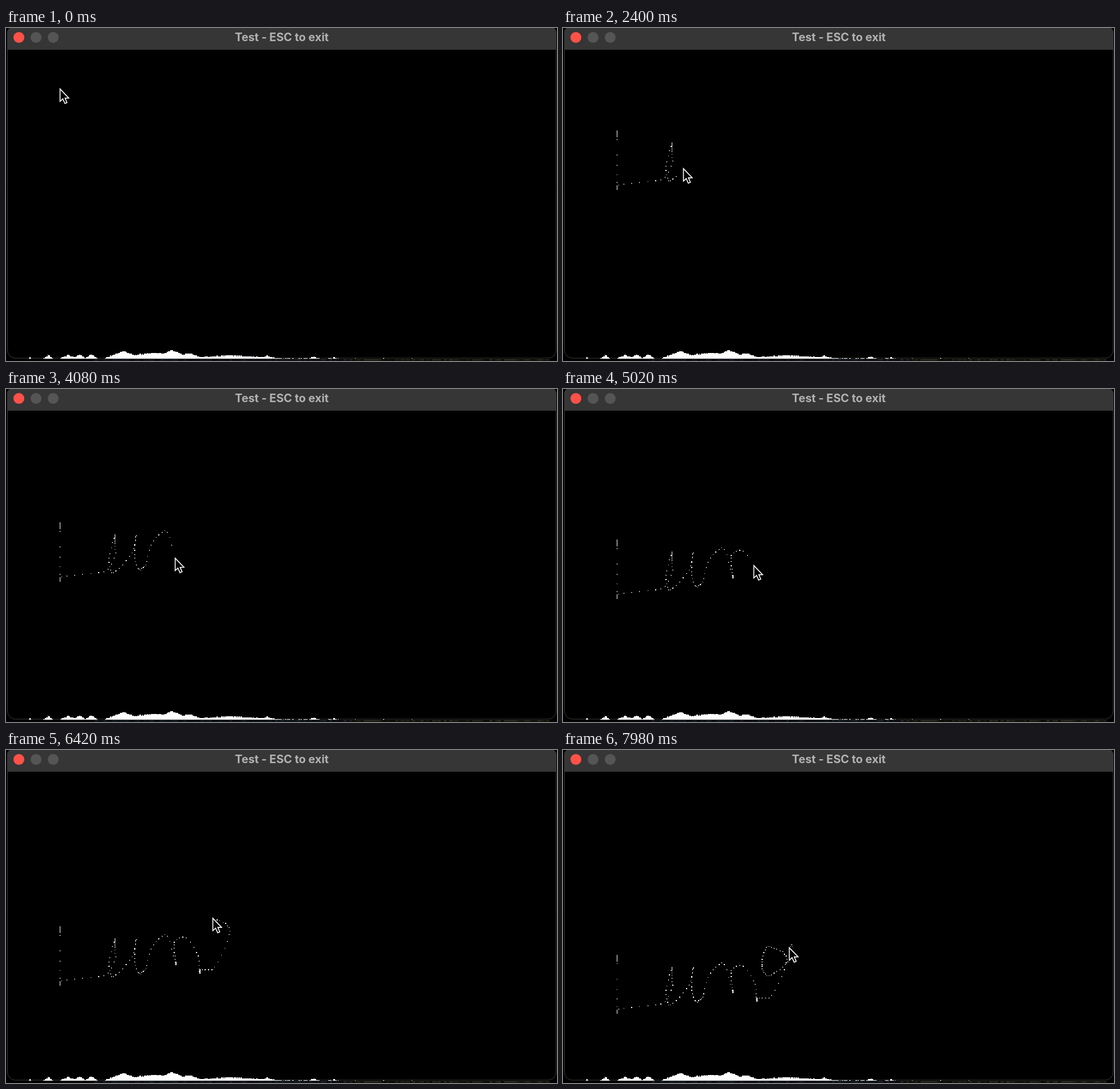
An HTML page with a canvas that plays this animation: 963x582 px, repeating every 8 s.

```html
<!DOCTYPE html>
<html lang="en">
<head>
<meta charset="utf-8">
<title>Falling sand</title>
<style>
  html, body { margin: 0; width: 100%; height: 100%; overflow: hidden; background: #000; }
  canvas { position: absolute; left: 0; top: 0; }
  #title {
    position: absolute; left: 0; top: 0; width: 964px; text-align: center;
    font: 700 19.8px/32px Inter, Roboto, sans-serif; color: #b2b2b2; white-space: pre;
  }
</style>
</head>
<body>
<canvas id="stage" width="963" height="582"></canvas>
<div id="title">Test - ESC to exit</div>
<script>
const LOOP = 8000;
const STEP = 840 / 18;          // ms per simulation step
const GRAIN = 1.5;              // size of one grain, also its fall per step
const LEFT = 2, TOP = 38;       // origin of the sand grid
const ROWS = 360;
const LAG = 2;                  // steps before a new grain shows up

const ctx = document.getElementById('stage').getContext('2d');

// Turning points of the handwriting: step, x, y
const KEYS = [
  [3, 94, 106], [5, 94, 150.5], [10, 94, 218], [15, 94, 219.5], [22, 171, 220.5],
  [26, 191, 193], [34, 190, 176], [38, 190, 181], [43, 180, 228], [48, 187, 261],
  [54, 220, 234.5], [59, 227, 213], [64, 224, 253.5], [70, 235, 288.5], [74, 244, 286],
  [78, 253, 257.5], [83, 277, 240], [89, 296, 301], [95, 296, 305], [100, 293, 283.5],
  [104, 308, 275.5], [108, 333, 308], [114, 338, 353], [118, 338, 354.5], [123, 359, 360.5],
  [130, 391, 303.5], [138, 361, 293.5], [146, 347, 337], [154, 361, 368.5], [162, 395, 353],
  [167, 400, 334.5], [171, 395, 345]
];

// Settled sand as tents: centre, height, half width
const TENTS = [
  [41, 3, 4], [73, 7, 10], [108, 7, 16], [128, 8, 12], [148, 8, 12], [204, 14, 34],
  [258, 11, 90], [289, 15, 40], [318, 10, 30], [390, 6, 110], [456, 6, 14],
  [537, 4, 8], [573, 3, 5]
];

function seeded(seed) {
  return () => (seed = (seed * 16807) % 2147483647) / 2147483647;
}

const slope = (i, axis) =>
  (KEYS[i + 1][axis] - KEYS[i][axis]) / (KEYS[i + 1][0] - KEYS[i][0]);

// Smooth tangent that never overshoots: flat at turning points and pauses
function tangent(i, axis) {
  if (i === 0 || i === KEYS.length - 1) return 0;
  const a = slope(i - 1, axis), b = slope(i, axis);
  if (a * b <= 0) return 0;
  const before = KEYS[i][0] - KEYS[i - 1][0], after = KEYS[i + 1][0] - KEYS[i][0];
  const mean = (a * after + b * before) / (before + after);
  return Math.sign(a) * Math.min(Math.abs(mean), 3 * Math.abs(a), 3 * Math.abs(b));
}

function pointerAt(step) {
  const last = KEYS.length - 1;
  if (step <= KEYS[0][0]) return KEYS[0].slice(1);
  if (step >= KEYS[last][0]) return KEYS[last].slice(1);
  const i = KEYS.findIndex(k => k[0] > step) - 1;
  const span = KEYS[i + 1][0] - KEYS[i][0];
  const u = (step - KEYS[i][0]) / span, v = 1 - u;
  return [1, 2].map(axis =>
    KEYS[i][axis] * v * v * (1 + 2 * u) + KEYS[i + 1][axis] * u * u * (3 - 2 * u) +
    span * u * v * (v * tangent(i, axis) - u * tangent(i + 1, axis)));
}

function rect(color, x, y, w, h) {
  ctx.fillStyle = color;
  ctx.fillRect(x, y, w, h);
}

// White cells of the sand grid, on whole pixels
function cells(col, row, rows = 1) {
  const x = Math.round(LEFT + col * GRAIN), y = Math.round(TOP + row * GRAIN);
  rect('#fff', x, y,
    Math.round(LEFT + (col + 1) * GRAIN) - x,
    Math.round(TOP + (row + rows) * GRAIN) - y);
}

function disc(color, x) {
  ctx.fillStyle = color;
  ctx.beginPath();
  ctx.arc(x, 16.5, 9.5, 0, Math.PI * 2);
  ctx.fill();
}

function drawWindow() {
  rect('#000', 0, 0, 963, 582);
  // Dim remains of the desktop below the window
  const random = seeded(7);
  for (let x = 150; x < 950; x += 5) {
    const hue = x < 600 ? 210 : 55;
    rect(`hsl(${hue} 20% ${5 + random() * 14}%)`, x, 579, 5, 2);
  }

  ctx.beginPath();
  ctx.roundRect(2.5, -0.5, 959, 577.5, [8, 8, 14, 14]);
  ctx.fillStyle = '#000';
  ctx.fill();
  ctx.save();
  ctx.clip();
  rect('#363637', 2, 0, 960, TOP);
  ctx.restore();
  ctx.strokeStyle = '#3a3a34';
  ctx.lineWidth = 1;
  ctx.stroke();

  disc('#ff5148', 22.5);
  disc('#555', 52.5);
  disc('#555', 82.5);
}

function drawHeap() {
  const random = seeded(21);
  for (let col = 24; col < 472; col++) {
    const x = LEFT + col * GRAIN;
    const height = Math.max(...TENTS.map(([c, h, w]) => h * (1 - Math.abs(x - c) / w)));
    const stray = x > 470 && x < 580 && random() < 0.4 || col % 33 === 9 && x > 600;
    const rows = height > 0 ? Math.round(height / GRAIN + random() * 0.8 - 0.4) : 0;
    const total = Math.max(rows, stray ? 1 : 0);
    if (total) cells(col, ROWS - total, total);
  }
}

function drawGrains(step) {
  for (let k = -4; k <= step - LAG; k++) {
    const [x, y] = pointerAt(k);
    cells(Math.floor((x - LEFT) / GRAIN), Math.floor((y - TOP) / GRAIN) + step - k);
  }
}

function drawPointer(x, y) {
  ctx.save();
  ctx.translate(x, y);
  ctx.beginPath();
  ctx.moveTo(0.5, 0.6);
  ctx.lineTo(0.5, 22.3);
  ctx.lineTo(5.3, 17.9);
  ctx.lineTo(9, 26);
  ctx.lineTo(12.6, 24.3);
  ctx.lineTo(9.2, 16.6);
  ctx.lineTo(15.8, 16.4);
  ctx.closePath();
  ctx.fillStyle = '#000';
  ctx.fill();
  ctx.strokeStyle = '#fff';
  ctx.lineWidth = 1.6;
  ctx.stroke();
  ctx.restore();
}

function draw(time) {
  const step = Math.round((time + 20) / STEP);
  drawWindow();
  drawHeap();
  drawGrains(step);
  drawPointer(...pointerAt(step));
}

const start = performance.now();
function tick() {
  draw((performance.now() - start) % LOOP);
  requestAnimationFrame(tick);
}
tick();
</script>
</body>
</html>
```
